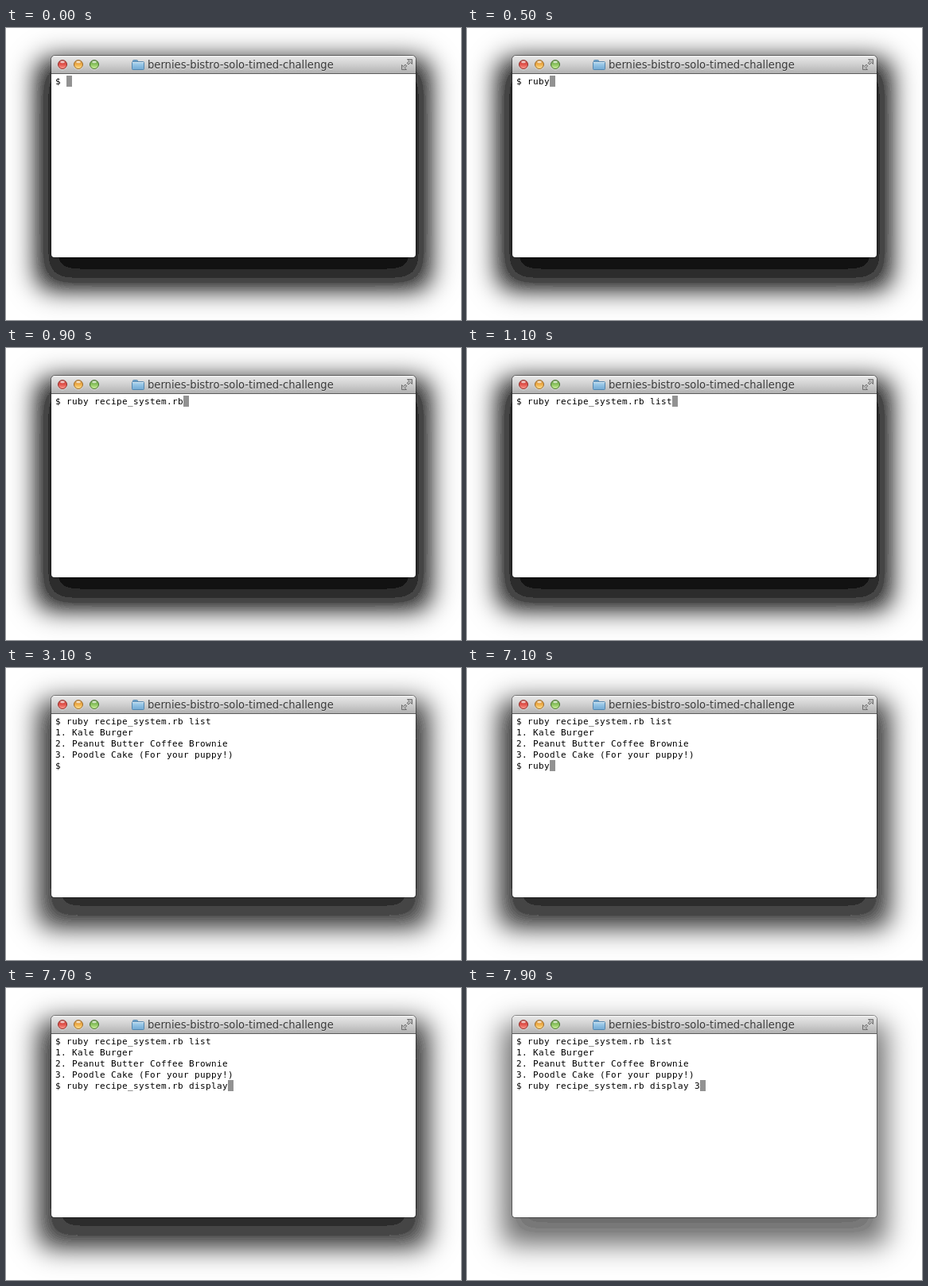
Recreate the animation shown at these times as an HTML page with a canvas. Size 572 by 368 pixels, loop 8 s.

```html
<!DOCTYPE html>
<html lang="en">
<head>
<meta charset="utf-8">
<title>Terminal session</title>
<style>
html, body { margin: 0; width: 100%; height: 100%; overflow: hidden; background: #fff; }
canvas { display: block; }
</style>
</head>
<body>
<canvas id="stage" width="572" height="368"></canvas>
<script>
const W = 572, H = 368, LOOP = 8000;
const ctx = document.getElementById("stage").getContext("2d");
const win = { x: 57, y: 35, w: 458, h: 254, bar: 22 };
const cell = { x: 62, y: 60, w: 7, h: 14 };

const script = "ruby recipe_system.rb";
const listing = [
  "$ " + script + " list",
  "1. Kale Burger",
  "2. Peanut Butter Coffee Brownie",
  "3. Poodle Cake (For your puppy!)"
];

// start time, finished lines, typed command, cursor visible
const steps = [
  [0, 0, "", true],
  [500, 0, "ruby", true],
  [700, 0, "ruby recipe_", true],
  [900, 0, script, true],
  [1100, 0, script + " list", true],
  [3100, 4, "", false],
  [7100, 4, "ruby", true],
  [7300, 4, "ruby recipe_", true],
  [7500, 4, script, true],
  [7700, 4, script + " display", true],
  [7900, 4, script + " display 3", true]
];

// Logistic approximation of the normal distribution
const phi = z => 1 / (1 + Math.exp(-1.5976 * z - 0.07057 * z ** 3));
const falloff = (v, lo, hi) => phi((v - lo) / 17) * phi((hi - v) / 17);

function band(v) {
  if (v < 82) return 18 + 25.5 * Math.max(0, Math.round((v - 18) / 25.5));
  if (v < 135) return Math.round(v / 10) * 10;
  return v;
}

function makeShadow(layers) {
  const c = document.createElement("canvas");
  c.width = W;
  c.height = H;
  const g = c.getContext("2d");
  const img = g.createImageData(W, H);
  for (let y = 0, i = 0; y < H; y++) {
    const fy = falloff(y + 0.5, 45, 323);
    for (let x = 0; x < W; x++, i += 4) {
      const a = 0.58 * fy * falloff(x + 0.5, 45, 527);
      const v = band(255 * (1 - a) ** layers);
      img.data[i] = img.data[i + 1] = img.data[i + 2] = v;
      img.data[i + 3] = 255;
    }
  }
  g.putImageData(img, 0, 0);
  return c;
}

const shadows = [1, 2, 3].map(makeShadow);

function gradient(y0, y1, ...colors) {
  const g = ctx.createLinearGradient(0, y0, 0, y1);
  colors.forEach((c, i) => g.addColorStop(i / (colors.length - 1), c));
  return g;
}

function rounded(x, y, w, h, r) {
  ctx.beginPath();
  ctx.roundRect(x, y, w, h, r);
}

function drawButton(x, edge, top, mid, low) {
  const y = 46;
  ctx.beginPath();
  ctx.arc(x, y + 0.7, 6.2, 0, 7);
  ctx.fillStyle = "rgba(255,255,255,.55)";
  ctx.fill();
  ctx.beginPath();
  ctx.arc(x, y, 5.5, 0, 7);
  ctx.fillStyle = gradient(y - 6, y + 6, top, mid, low);
  ctx.fill();
  ctx.strokeStyle = edge;
  ctx.lineWidth = 1;
  ctx.stroke();
  ctx.beginPath();
  ctx.ellipse(x, y - 3.2, 2.8, 1.5, 0, 0, 7);
  ctx.fillStyle = "rgba(255,255,255,.65)";
  ctx.fill();
}

function drawFolder() {
  ctx.lineWidth = 1;
  ctx.strokeStyle = "#5687ae";
  rounded(159.5, 40.5, 6, 4, 1);
  ctx.fillStyle = "#79aed6";
  ctx.fill();
  ctx.stroke();
  rounded(158.5, 42.5, 15, 10, 1);
  ctx.fillStyle = gradient(42, 53, "#b5d9f0", "#8dbfe2", "#70a7d1");
  ctx.fill();
  ctx.stroke();
  ctx.fillStyle = "rgba(255,255,255,.5)";
  ctx.fillRect(159, 43, 14, 1);
}

function arrow(x, y, dir) {
  ctx.save();
  ctx.translate(x, y);
  ctx.scale(dir, dir);
  ctx.beginPath();
  [[0, 0], [0, 6], [-2, 4], [-4.5, 6.5], [-6.3, 4.7], [-3.8, 2.2], [-6, 0]]
    .forEach(p => ctx.lineTo(...p));
  ctx.closePath();
  ctx.fillStyle = "#b9b9b9";
  ctx.fill();
  ctx.strokeStyle = "#707070";
  ctx.lineWidth = 1;
  ctx.stroke();
  ctx.restore();
}

function drawWindow() {
  const { x, y, w, h, bar } = win;
  rounded(x - 0.5, y - 0.5, w + 1, h + 1, [5, 5, 4, 4]);
  ctx.strokeStyle = "rgba(0,0,0,.4)";
  ctx.lineWidth = 1;
  ctx.stroke();
  rounded(x, y, w, h, [5, 5, 4, 4]);
  ctx.fillStyle = "#fff";
  ctx.fill();

  ctx.save();
  ctx.clip();
  ctx.fillStyle = gradient(y, y + bar, "#e9e9e9", "#d0d0d0", "#b2b2b2");
  ctx.fillRect(x, y, w, bar);
  ctx.fillStyle = "#f6f6f6";
  ctx.fillRect(x, y, w, 1);
  ctx.fillStyle = "#5c5c5c";
  ctx.fillRect(x, y + bar, w, 1);
  ctx.restore();

  drawButton(71, "#8f302b", "#b84a44", "#e4524b", "#ffaaa0");
  drawButton(91, "#98682a", "#c98a3c", "#f0ad48", "#ffeb9c");
  drawButton(111, "#477030", "#659647", "#8bc45f", "#d6f7a5");
  drawFolder();
  arrow(510.5, 39.5, 1);
  arrow(497.5, 52.5, -1);

  const title = "bernies-bistro-solo-timed-challenge";
  ctx.font = "13.17px 'DejaVu Sans', sans-serif";
  ctx.letterSpacing = "0px";
  ctx.fillStyle = "rgba(255,255,255,.5)";
  ctx.fillText(title, 178, 52);
  ctx.fillStyle = "#383838";
  ctx.fillText(title, 178, 51);
}

function drawTerminal(done, typed, cursor) {
  const prompt = "$ " + typed;
  ctx.font = "11px 'DejaVu Sans Mono', monospace";
  ctx.letterSpacing = "0px";
  ctx.letterSpacing = cell.w - ctx.measureText("0").width + "px";
  if (cursor) {
    ctx.fillStyle = "#929292";
    ctx.fillRect(cell.x + prompt.length * cell.w, cell.y + done * cell.h, cell.w, cell.h);
  }
  ctx.fillStyle = "#000";
  [...listing.slice(0, done), prompt].forEach((line, row) =>
    ctx.fillText(line, cell.x, cell.y + row * cell.h + 11));
}

function frame(now) {
  const t = now % LOOP;
  const [, done, typed, cursor] = steps.findLast(s => s[0] <= t);
  const layers = t < 3100 ? 3 : t < 7900 ? 2 : 1;
  ctx.drawImage(shadows[layers - 1], 0, 0);
  drawWindow();
  drawTerminal(done, typed, cursor);
  requestAnimationFrame(frame);
}

requestAnimationFrame(frame);
</script>
</body>
</html>
```
